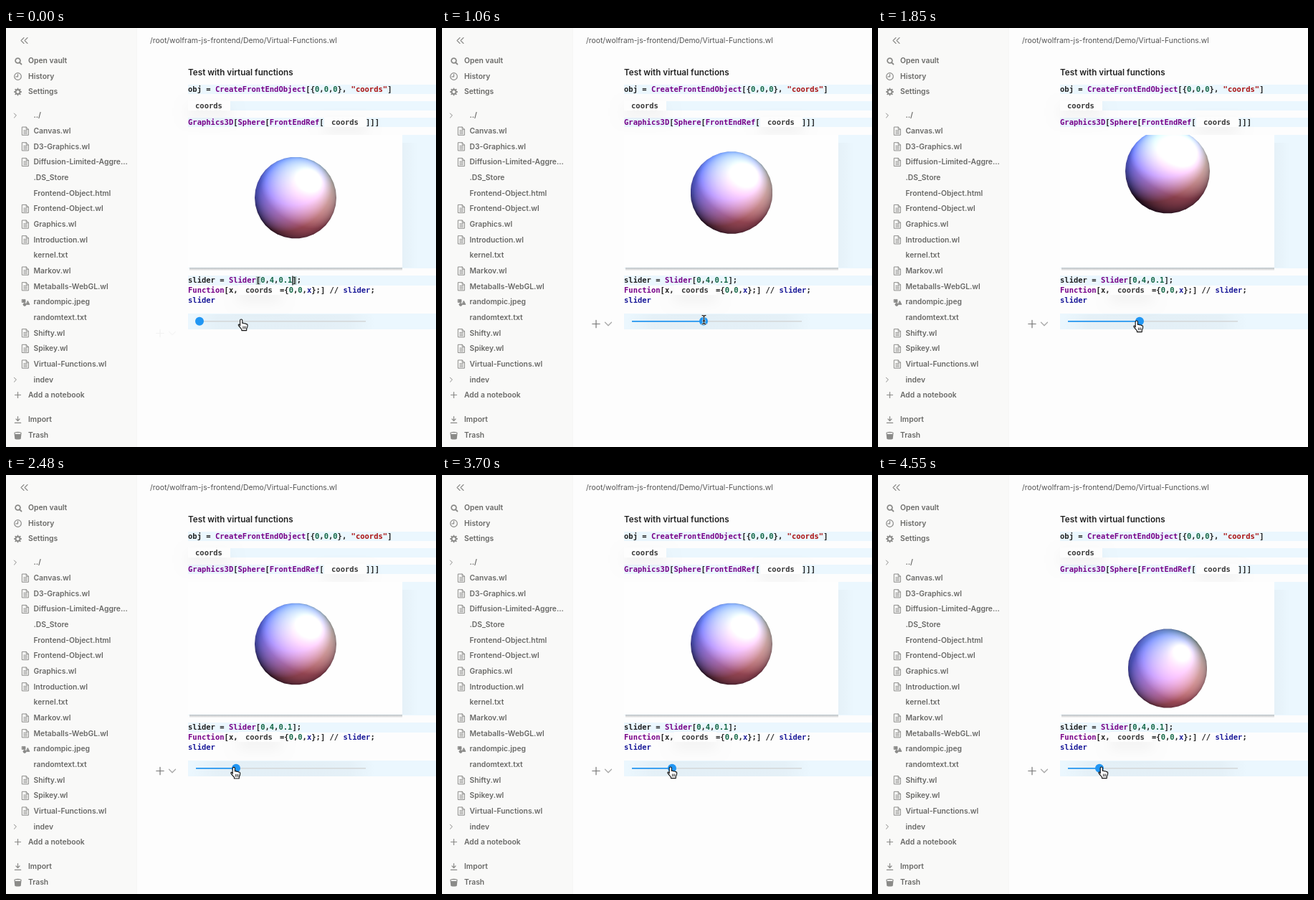
Write an HTML page with a canvas that moves like this. It is 600 px wide and 584 px high and loops after 4580 ms.

```html
<!DOCTYPE html>
<html lang="en">
<head>
<meta charset="utf-8">
<title>Virtual functions</title>
<style>
  html, body { margin: 0; width: 100%; height: 100%; overflow: hidden; background: #fdfdfd; }
  canvas { display: block; width: 600px; height: 584px; }
</style>
</head>
<body>
<canvas id="stage" width="600" height="584"></canvas>
<script>
const LOOP = 4580;
const ctx = document.getElementById('stage').getContext('2d');
const UI = 'Inter, sans-serif';
const MONO = 'bold 10.5px "DejaVu Sans Mono", monospace';
const BLUE = '#2196f3', CELL = '#ebf7fe', GREY = '#8b8b89';
const INK = '#222', FN = '#708', NUM = '#164', STR = '#a11', VAR = '#1a1a99';

// Keyframes are [ms, value] pairs, eased between neighbours.
const THUMB = [[0, 270], [930, 270], [960, 365], [1860, 365], [2480, 321], [2910, 309], [3700, 321], [4550, 309]];
const BALL_Y = [[0, 236.5], [940, 236.5], [1060, 229.5], [1640, 199.5], [1850, 199.5], [2480, 235.5], [2910, 259], [3700, 235.5], [4550, 269.5]];
const HAND_X = [[0, 328.4], [900, 365], [1300, 365], [1850, 361], [2480, 318], [2910, 313.4], [3700, 319], [4550, 312]];
const HAND_Y = [[0, 406], [900, 406], [1850, 408], [2480, 407.4], [2910, 407.4], [3700, 407], [4550, 407]];

const ease = u => u * u * (3 - 2 * u);
const clamp = (v, lo, hi) => Math.min(hi, Math.max(lo, v));

function track(keys, t) {
  const i = keys.findIndex(k => k[0] > t);
  if (i < 0) return keys[keys.length - 1][1];
  const [t0, a] = keys[i - 1], [t1, b] = keys[i];
  return a + (b - a) * ease((t - t0) / (t1 - t0));
}

function rect(x, y, w, h, fill) {
  ctx.fillStyle = fill;
  ctx.fillRect(x, y, w, h);
}

// Fills a box with evenly spaced shades of one grey, along x or y.
function shade(x, y, w, h, alphas, vertical) {
  const g = vertical ? ctx.createLinearGradient(0, y, 0, y + h) : ctx.createLinearGradient(x, 0, x + w, 0);
  alphas.forEach((a, i) => g.addColorStop(i / (alphas.length - 1), `rgba(70,75,80,${a})`));
  rect(x, y, w, h, g);
}

function text(str, x, y, font, fill) {
  ctx.font = font;
  ctx.fillStyle = fill;
  ctx.fillText(str, x, y);
}

function icon(d, x, y, { fill, stroke = GREY, width = 1.2 } = {}) {
  const path = new Path2D(d);
  ctx.save();
  ctx.translate(x, y);
  if (fill) { ctx.fillStyle = fill; ctx.fill(path); }
  if (stroke) {
    ctx.strokeStyle = stroke;
    ctx.lineWidth = width;
    ctx.lineCap = ctx.lineJoin = 'round';
    ctx.stroke(path);
  }
  ctx.restore();
}

function code(x, y, ...parts) {
  for (const [str, fill] of parts) {
    text(str, x, y, MONO, fill);
    x += ctx.measureText(str).width;
  }
}

function pill(x, y) {
  ctx.save();
  ctx.shadowColor = 'rgba(0,0,0,.05)';
  ctx.shadowBlur = 18;
  ctx.shadowOffsetY = 9;
  rect(x - 10, y - 11, 59, 14, '#fdfdfd');
  ctx.restore();
  text('coords', x, y, MONO, '#383838');
}

const ICONS = {
  search: 'M3.4 0a3.4 3.4 0 1 1-6.8 0a3.4 3.4 0 1 1 6.8 0M2.6 2.6L5 5',
  clock: 'M4.8 0a4.8 4.8 0 1 1-9.6 0a4.8 4.8 0 1 1 9.6 0M0-3V.4H-2.6',
  gear: 'M3 0a3 3 0 1 1-6 0a3 3 0 1 1 6 0M0-4.6V-3.5M0 4.6V3.5M-4.6 0H-3.5M4.6 0H3.5M-3.3-3.3l1 1M3.3 3.3l-1-1M-3.3 3.3l1-1M3.3-3.3l-1 1',
  file: 'M-4.3-5.6H1.2L4.4-2.4V5.6H-4.3ZM1.2-5.6V-2.4H4.4M-2.3-.8H2.4M-2.3 1.3H2.4M-2.3 3.4H2.4',
  image: 'M-5-3.5h4.5v4h-4.5zM-3.5 3.5a2 2 0 1 0 4 0a2 2 0 1 0-4 0M3-1.5l2.5 5h-5z',
  plus: 'M-4 0H4M0-4V4',
  right: 'M-1.6-3L1.4 0L-1.6 3',
  import: 'M0-4.5V1.5M-2.5-1L0 1.5L2.5-1M-4.2 4.3H4.2',
  trash: 'M-4.5-3.6q4.5-2 9 0L3.6 4.4q-3.6 1-7.2 0z'
};

function sidebar() {
  rect(0, 0, 182, 584, '#f9f9f8');
  rect(182, 0, 1, 584, '#f6f6f5');
  const label = (str, x, y) => text(str, x, y + 3.4, `600 10.35px ${UI}`, '#696967');
  icon('M-.5-4L-4.5 0L-.5 4M4.5-4L.5 0L4.5 4', 25.5, 17.5, { width: 1.1 });

  const menu = [
    ['search', 'Open vault', 45.5], ['clock', 'History', 67.5], ['gear', 'Settings', 89],
    ['plus', 'Add a notebook', 511.5], ['import', 'Import', 546], ['trash', 'Trash', 568]
  ];
  for (const [name, str, y] of menu) {
    const solid = name === 'trash';
    icon(ICONS[name], 16.5, y, { width: name === 'search' || name === 'gear' ? 1.8 : 1.2, fill: solid && GREY });
    if (solid) icon('M-3-2.8H3', 16.5, y, { stroke: '#f9f9f8', width: 1.8 });
    label(str, 31, y);
  }

  const files = ['../', 'Canvas.wl', 'D3-Graphics.wl', 'Diffusion-Limited-Aggre...', '.DS_Store',
    'Frontend-Object.html', 'Frontend-Object.wl', 'Graphics.wl', 'Introduction.wl', 'kernel.txt',
    'Markov.wl', 'Metaballs-WebGL.wl', 'randompic.jpeg', 'randomtext.txt', 'Shifty.wl',
    'Spikey.wl', 'Virtual-Functions.wl', 'indev'];
  files.forEach((name, i) => {
    const y = 122 + i * 21.66;
    if (/\.wl$|Aggre/.test(name)) icon(ICONS.file, 27, y, { width: 1 });
    else if (/jpeg$/.test(name)) icon(ICONS.image, 27.5, y, { fill: GREY, width: 0.8 });
    else if (i === 0 || name === 'indev') icon(ICONS.right, 13, y, { width: 1 });
    label(name, 38.5, y);
  });
}

function notebook() {
  text('/root/wolfram-js-frontend/Demo/Virtual-Functions.wl', 201, 21, `10.4px ${UI}`, '#555');
  text('Test with virtual functions', 254, 66, `600 11.7px ${UI}`, '#222');
  for (const [y, h] of [[79, 13], [102, 13], [125, 13], [149, 186], [345, 14], [398, 22]])
    rect(254, y, 346, h, CELL);

  code(254, 89, ['obj = ', INK], ['CreateFrontEndObject', FN], ['[{', INK], ['0', NUM], [',', INK],
    ['0', NUM], [',', INK], ['0', NUM], ['}, ', INK], ['"coords"', STR], [']', INK]);
  pill(264, 112);
  pill(454, 135);
  code(254, 135, ['Graphics3D', FN], ['[', INK], ['Sphere', FN], ['[', INK], ['FrontEndRef', FN], ['[', INK]);
  code(502, 135, [']]]', INK]);
  rect(254, 149, 299, 185, '#fefefe');
  shade(256, 334, 297, 4.5, [0.3, 0.2, 0], true);
  shade(553, 160, 22, 174, [0.035, 0.02, 0]);
}

function sliderCode(active) {
  if (active) for (const x of [348.8, 399.4]) rect(x, 346, 6.3, 12, '#b9cfcb');
  code(254, 355, ['slider = ', INK], ['Slider', FN], ['[', INK], ['0', NUM], [',', INK], ['4', NUM],
    [',', INK], ['0.1', NUM], ['];', INK]);
  if (active) rect(399.4, 345.5, 1.2, 13, '#111');
  pill(334, 369);
  code(254, 369, ['Function', FN], ['[x, ', INK]);
  code(382, 369, ['={', INK], ['0', NUM], [',', INK], ['0', NUM], [',', INK], ['x', VAR],
    ['};] // ', INK], ['slider', VAR], [';', INK]);
  code(254, 383, ['slider', VAR]);
}

// The lights tip downwards as the ball sinks in the view.
const LIGHTS = [
  { dir: [-0.45, 0.55, 0.7], rgb: [0.22, 0.34, 0.78] },
  { dir: [0.5, 0.65, 0.57], rgb: [0.3, 0.5, 0.42] },
  { dir: [0.33, -0.17, 0.9], rgb: [0.58, 0.28, 0.28] }
];
const AMBIENT = [0.12, 0.05, 0.1];
const BALL_SIZE = 120;
const ballCanvas = document.createElement('canvas');
ballCanvas.width = ballCanvas.height = BALL_SIZE;
const ballCtx = ballCanvas.getContext('2d');
const ballPixels = ballCtx.createImageData(BALL_SIZE, BALL_SIZE);

const dot = (a, b) => a[0] * b[0] + a[1] * b[1] + a[2] * b[2];

function shadeBall(tilt) {
  const size = BALL_SIZE, { data } = ballPixels;
  const lights = LIGHTS.map(({ dir: [x, y, z], rgb }) => ({ dir: [x, y - tilt, z], rgb }));
  for (let p = 0; p < size * size; p++) {
    let x = (p % size + 0.5) / size * 2 - 1;
    let y = 1 - (Math.floor(p / size) + 0.5) / size * 2;
    const d = Math.hypot(x, y);
    if (d > 1) { x /= d; y /= d; }
    const n = [x, y, Math.sqrt(Math.max(0, 1 - x * x - y * y))];
    const shine = 0.25 * Math.max(0, dot(n, [0.4, 0.42, 0.81])) ** 18;
    const rgb = AMBIENT.map(a => a + shine);
    for (const light of lights) {
      const lit = Math.max(0, dot(n, light.dir));
      for (let k = 0; k < 3; k++) rgb[k] += light.rgb[k] * lit;
    }
    for (let k = 0; k < 3; k++) data[p * 4 + k] = 255 * rgb[k];
    data[p * 4 + 3] = 255;
  }
  ballCtx.putImageData(ballPixels, 0, 0);
}

function ball(y) {
  const x = 404, drop = y - 236.5, r = 57 - drop * 0.055, sides = 34;
  shadeBall(drop * 0.006);
  ctx.save();
  ctx.beginPath();
  ctx.rect(254, 149, 299, 185);
  ctx.clip();
  ctx.beginPath();
  for (let i = 0; i < sides; i++) {
    const a = i / sides * Math.PI * 2;
    ctx.lineTo(x + r * Math.cos(a), y + r * Math.sin(a));
  }
  ctx.clip();
  ctx.drawImage(ballCanvas, x - r, y - r, 2 * r, 2 * r);
  ctx.restore();
}

function slider(x) {
  shade(258, 399, 257, 21, [0, 0.04, 0.045, 0.045, 0.045, 0.045, 0.04, 0]);
  rect(265, 408, 237, 1.6, '#d4d8da');
  rect(265, 408, x - 265, 1.7, BLUE);
  ctx.beginPath();
  ctx.arc(x, 408.8, 6, 0, Math.PI * 2);
  ctx.fillStyle = BLUE;
  ctx.fill();
}

function cellTools(t) {
  const u = ease(clamp(t / 350, 0, 1));
  ctx.globalAlpha = 0.08 + 0.92 * u;
  const y = 425.5 - 13 * u;
  icon('M-5.2 0H5.2M0-5.2V5.2', 215, y, { stroke: '#777', width: 1.2 });
  icon('M-4.5-2.2L0 2.3L4.5-2.2', 232, y, { stroke: '#aaa', width: 1.4 });
  ctx.globalAlpha = 1;
}

function pointer(t) {
  const x = track(HAND_X, t), y = track(HAND_Y, t);
  if (t > 900 && t < 1300) {
    const beam = 'M-2.5-6Q0-6 0-4.5Q0-6 2.5-6M0-4.5V4.5M-2.5 6Q0 6 0 4.5Q0 6 2.5 6M-1.5 1.5H1.5';
    icon(beam, x + 0.5, y + 0.5, { stroke: '#fff', width: 2.4 });
    icon(beam, x + 0.5, y + 0.5, { stroke: '#111', width: 1.2 });
    return;
  }
  icon('M-1.8 9V1.6a1.6 1.6 0 0 1 3.2 0V5.5q2-.8 2.6.5 2-.6 2.5.7 2.2-.4 2.2 1.8 0 2.6-1.4 4.8V15.6H.4V13.8Q-1.5 12-3.6 9.2q-1.2-1.8.1-2.2 1-.2 1.7 2z',
    x, y, { fill: '#fff', stroke: '#111', width: 1.1 });
  icon('M2.4 10v3M4.2 10v3M6 10v3', x, y, { stroke: '#111', width: 0.8 });
}

function draw(now) {
  const t = now % LOOP;
  rect(0, 0, 600, 584, '#fdfdfd');
  sidebar();
  notebook();
  ball(track(BALL_Y, t));
  sliderCode(t < 300);
  slider(track(THUMB, t));
  cellTools(t);
  pointer(t);
}

let start;
function frame(now) {
  start ??= now;
  draw(now - start);
  requestAnimationFrame(frame);
}
draw(0);
requestAnimationFrame(frame);
</script>
</body>
</html>
```
